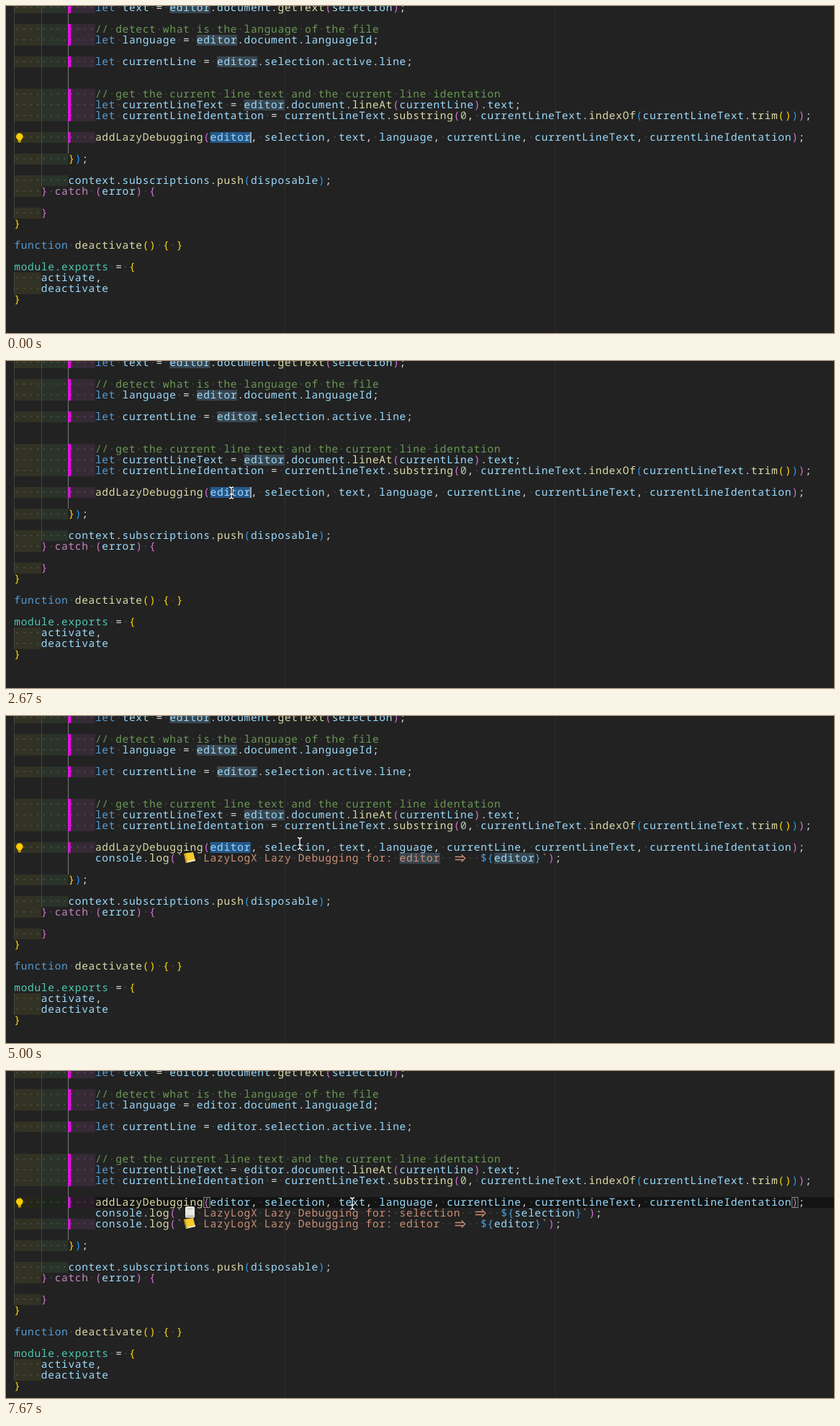
Write an HTML page that moves like this. It is 1150 by 454 pixels and loops after 8000 ms.

```html
<!DOCTYPE html>
<html lang="en">
<head>
<meta charset="utf-8">
<title>Editor</title>
<style>
html, body { margin: 0; width: 100%; height: 100%; overflow: hidden; background: #222; }
svg { display: block; width: 1150px; height: 454px; background: #222; }
text { font: 500 14.5px "Noto Sans Mono", "DejaVu Sans Mono", monospace; white-space: pre; text-rendering: geometricPrecision; }
</style>
</head>
<body>
<svg id="stage" viewBox="0 0 1150 454"></svg>
<script>
const LEFT = 11.3, CELL = 9.39, ROW = 15, SIZE = 14.5;
const LOOP = 8000, STEP = 1000 / 3, STEPS = 24;
const CALL = 12; // row of the call that is being debugged
const stage = document.getElementById('stage');
const BRACKETS = ['#ffd700', '#da70d6', '#2a9df4'];
const COLORS = {
  com: '#6a9955', str: '#ce9178', tpl: '#4a9fe0', key: '#569cd6', ctl: '#c586c0',
  mod: '#4ec9b0', fn: '#dcdcaa', num: '#b5cea8', id: '#9cdcfe', op: '#d8d8d8'
};
const TOKENS = new RegExp([
  '(?<com>//.*)', '(?<str>`[^$`]*(?=\\$)|`)', '(?<tpl>\\$\\{|\\}(?=`))',
  '(?<key>\\b(?:let|function)\\b)', '(?<ctl>\\bcatch\\b)', '(?<mod>module\\.exports)',
  '(?<fn>\\w+(?=\\())', '(?<num>\\d+)', '(?<id>[a-zA-Z]\\w*)',
  '(?<open>[({])', '(?<close>[)}])', '(?<op>\\S)'
].join('|'), 'g');

// row: indent level, code, bracket depth
const HEAD = [
  [3, 'let text = editor.document.getText(selection);', 4],
  null,
  [3, '// detect what is the language of the file', 4],
  [3, 'let language = editor.document.languageId;', 4],
  null,
  [3, 'let currentLine = editor.selection.active.line;', 4],
  null,
  null,
  [3, '// get the current line text and the current line identation', 4],
  [3, 'let currentLineText = editor.document.lineAt(currentLine).text;', 4],
  [3, 'let currentLineIdentation = currentLineText.substring(0, currentLineText.indexOf(currentLineText.trim()));', 4],
  null,
  [3, 'addLazyDebugging(editor, selection, text, language, currentLine, currentLineText, currentLineIdentation);', 4]
];
const TAIL = [
  null,
  [2, '});', 4],
  null,
  [2, 'context.subscriptions.push(disposable);', 2],
  [1, '} catch (error) {', 2],
  null,
  [1, '}', 2],
  [0, '}', 1],
  null,
  [0, 'function deactivate() { }', 0],
  null,
  [0, 'module.exports = {', 0],
  [1, 'activate,', 1],
  [1, 'deactivate', 1],
  [0, '}', 1]
];

const GAP = '\u00a0\u00a0'; // room for an icon or a two-cell arrow
const logRow = word => [3, 'console.log(`' + GAP + ' LazyLogX Lazy Debugging for: ' +
  word + '  ' + GAP + '  ${' + word + '}`);', 4];

// changes of state, by step
const CHANGES = {
  0: { word: 'editor', line: null, caret: at(35, CALL), blur: false, logs: [], fresh: false, bulb: true, mouse: null },
  4: { mouse: [302, 140] },
  5: { word: null, line: 8, caret: [307, 138], mouse: [298, 128] },
  6: { caret: at(30, 8), bulb: false },
  7: { mouse: [310, 170] },
  8: { word: 'editor', line: null, caret: at(35, CALL), mouse: [313, 183] },
  9: { bulb: true },
  11: { blur: true },
  13: { blur: false, logs: ['editor'], fresh: true },
  14: { fresh: false, mouse: [360, 180] },
  15: { caret: null, mouse: [408, 177] },
  16: { word: null, line: CALL, caret: at(42, CALL), mouse: [407, 181] },
  17: { word: 'selection', line: null, caret: at(46, CALL), bulb: false, mouse: [406, 182] },
  18: { bulb: true },
  19: { blur: true },
  20: { blur: false, logs: ['selection', 'editor'], fresh: true },
  21: { fresh: false },
  22: { mouse: [455, 183] },
  23: { word: null, line: CALL, caret: at(50, CALL), mouse: [481, 184] }
};

const ruler = document.createElement('canvas').getContext('2d');
ruler.font = '500 100px "Noto Sans Mono", "DejaVu Sans Mono", monospace';
const SPACING = CELL - ruler.measureText('0').width * SIZE / 100;

function colX(col) { return LEFT + col * CELL; }
function at(col, row) { return [colX(col), row * ROW + 2]; }
const rect = (x, y, w, h, fill, more = '') =>
  `<rect x="${x}" y="${y}" width="${w}" height="${h}" fill="${fill}" ${more}/>`;
const cells = (col, row, n, fill, more) => rect(colX(col), row * ROW - 5, n * CELL, ROW, fill, more);
const text = (col, row, str, fill) =>
  `<text x="${colX(col)}" y="${row * ROW + 7}" fill="${fill}" letter-spacing="${SPACING}">${str}</text>`;
const path = (d, more) => `<path d="${d}" ${more}/>`;

function codeText([indent, code, start], row) {
  let depth = start, out = '';
  for (const m of code.matchAll(TOKENS)) {
    const kind = Object.keys(m.groups).find(k => m.groups[k] !== undefined);
    const fill = kind === 'open' ? BRACKETS[depth++ % 3]
      : kind === 'close' ? BRACKETS[--depth % 3] : COLORS[kind];
    out += text(indent * 4 + m.index, row, m[0], fill);
  }
  return out;
}

function dots([indent, code], row, bare) {
  const full = (bare ? GAP.repeat(2 * indent) : ' '.repeat(4 * indent)) + code;
  return text(0, row, full.replace(/[^ ]/g, '\u00a0').replace(/ /g, '·'), 'rgba(255,255,255,.19)');
}

function indentBands(indent, row) {
  const tints = ['rgba(255,255,64,.075)', 'rgba(127,255,127,.08)', 'rgba(255,127,255,.085)'];
  return tints.slice(0, indent).map((c, i) => cells(i * 4, row, 4, c)).join('');
}

function marks(s, [indent, code], row) {
  if (!s.word) return '';
  let out = '';
  for (const m of code.matchAll(new RegExp('\\b' + s.word + '\\b', 'g'))) {
    const fill = s.blur ? '#4b555b' : row === CALL ? '#26588a' : '#39464f';
    out += cells(indent * 4 + m.index, row, s.word.length, fill);
  }
  return out;
}

function arrow(col, row) {
  const x = colX(col), y = row * ROW + 2.5;
  return path(`M${x + 2} ${y - 2}h11M${x + 2} ${y + 2}h11M${x + 11} ${y - 5}l5 5l-5 5`,
    `fill="none" stroke="${COLORS.str}" stroke-width="1.3"`);
}

function notebook(row, pale) {
  const y = row * ROW - 7;
  if (pale) {
    return rect(249, y, 13, 16, '#e9e8e2', 'rx="2"') + rect(252, y + 3, 7, 1, '#b5b3aa') +
      rect(250, y + 12, 11, 4, '#cbc9c0', 'rx="1"');
  }
  return path(`M247 ${y + 3}l13 -2l3 12l-13 3z`, 'fill="#f5cb2e"') +
    path(`M250 ${y + 16}l13 -3l0 -2l-13 3z`, 'fill="#efe9cf"') +
    path(`M247 ${y + 3}l2 0l3 12l-2 1z`, 'fill="#c99a1d"');
}

function bulb() {
  return '<circle cx="18.8" cy="181.3" r="4.8" fill="#fc0"/>' +
    rect(16.6, 184, 4.4, 3, '#fc0') + rect(16.8, 187.6, 4, 1.6, '#fc0');
}

function beam([x, y]) {
  const d = `M${x - 3} ${y - 8}q3 0 3 2.5v11q0 2.5 -3 2.5M${x + 3} ${y - 8}q-3 0 -3 2.5M${x} ${y + 5.5}q0 2.5 3 2.5M${x - 2} ${y + 2}h4`;
  return path(d, 'fill="none" stroke="#111" stroke-width="3.2"') +
    path(d, 'fill="none" stroke="#fff" stroke-width="1.3"');
}

function draw(step) {
  const s = {};
  for (let i = 0; i <= step; i++) Object.assign(s, CHANGES[i]);
  const n = s.logs.length, shift = n * ROW;
  const rows = [...HEAD, ...s.logs.map(logRow), ...TAIL];
  const isLog = r => r > CALL && r <= CALL + n;
  let under = rect(386.5, 0, 1, 454, '#2e2e2e') + rect(762.5, 0, 1, 454, '#352b2b');
  let over = '';

  if (s.line !== null) under += rect(11, s.line * ROW - 5, 1139, ROW, '#141414');
  under += rect(11, 0, 1, 295 + shift, '#414141') + rect(11, 370 + shift, 1, 30, '#414141') +
    rect(49, 0, 1, 250 + shift, '#414141') + rect(86, 0, 1, 205 + shift, '#7a7a7a');

  rows.forEach((r, k) => {
    if (!r) return;
    const bare = isLog(k) && k === CALL + 1;
    if (!bare) {
      under += indentBands(r[0], k);
      if (r[0] === 3) under += rect(86.3, k * ROW - 5, k < CALL ? 3.8 : 3.2, ROW, '#f400f4');
    }
    if (!(s.fresh && isLog(k))) under += marks(s, r, k);
    over += dots(r, k, bare) + codeText(r, k);
    if (isLog(k)) {
      over += arrow(59 + s.logs[k - CALL - 1].length, k);
    }
  });
  for (let i = n; i > 0; i--) over += notebook(CALL + i, n === 2 && i === 1);

  if (s.line === CALL) {
    const code = HEAD[CALL][1];
    for (const i of [code.indexOf('('), code.lastIndexOf(')')]) {
      under += rect(colX(12 + i) + .5, 175.5, CELL - 1, 14, 'rgba(0,100,0,.1)', 'stroke="#888"');
    }
  }
  if (s.bulb) over += bulb();
  if (s.caret) over += rect(s.caret[0] - .7, s.caret[1] - 7, 1.5, ROW, '#c8c8c8');
  if (s.mouse) over += beam(s.mouse);
  stage.innerHTML = under + over;
}

let shown = -1;
function tick(now) {
  const step = Math.min(STEPS - 1, Math.floor((now % LOOP + 4) / STEP));
  if (step !== shown) draw(shown = step);
  requestAnimationFrame(tick);
}
tick(0);
</script>
</body>
</html>
```
